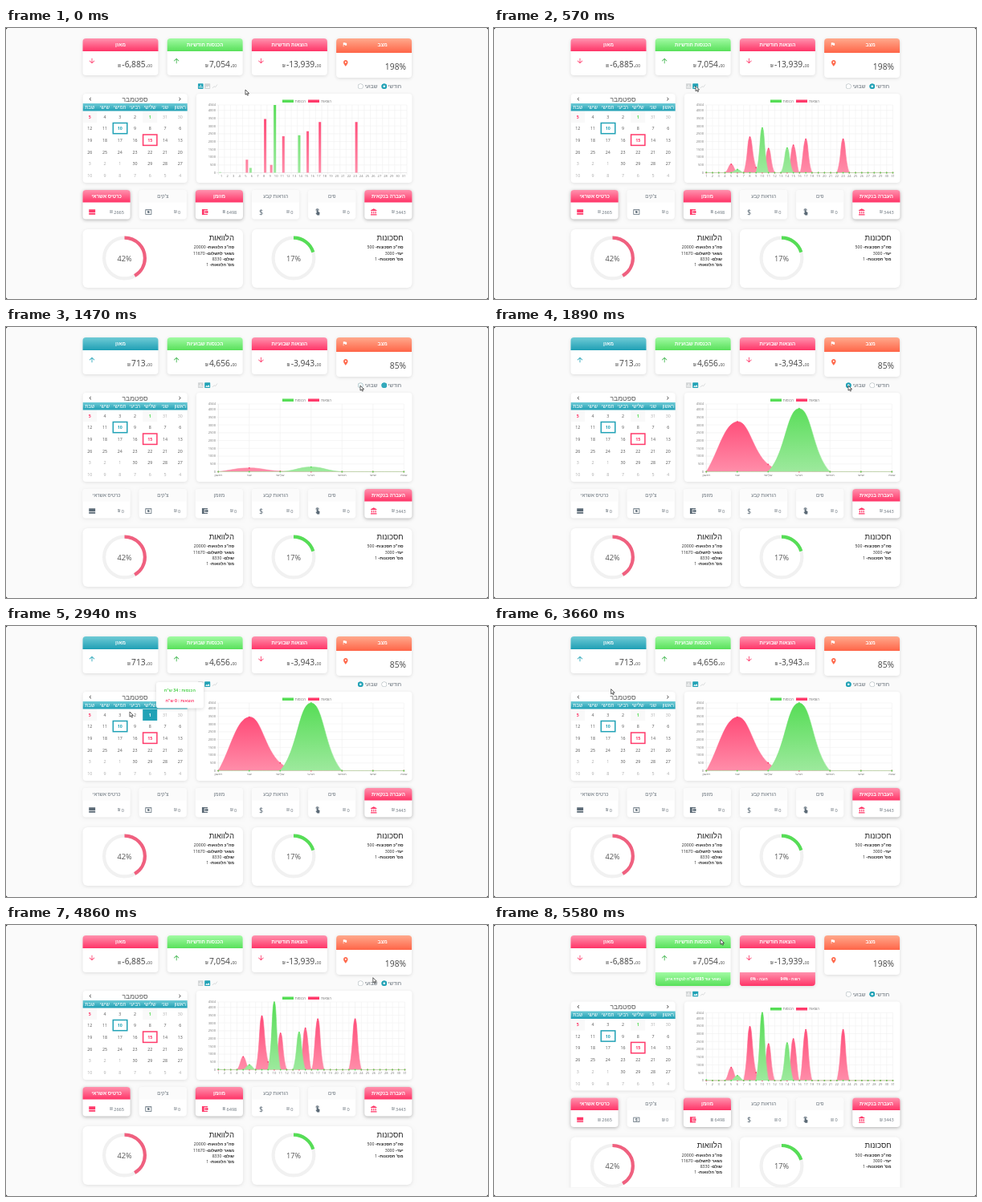
An HTML page with a canvas that plays this animation: 600x338 px, repeating every 6210 ms.

```html
<!DOCTYPE html>
<html lang="he">
<head>
<meta charset="utf-8">
<title>Budget dashboard</title>
<style>
html, body { margin: 0; width: 100%; height: 100%; overflow: hidden; background: #fafafa; }
canvas { display: block; width: 600px; height: 338px; }
</style>
</head>
<body>
<canvas id="stage"></canvas>
<script>
const LOOP = 6210, TO_AREA = 360, TO_WEEK = 1455, TO_MONTH = 4127;
const canvas = document.getElementById('stage'), c = canvas.getContext('2d');
const dpr = window.devicePixelRatio || 1;
canvas.width = 600 * dpr;
canvas.height = 338 * dpr;

const PINK = '#ff3a6b', GREEN = '#56dd56', TEAL = '#21a2b6', GREY = '#667079', DARK = '#444';
const GRADS = {
  pink: ['#ff92ae', '#ff3467'], green: ['#a2fba4', '#58e05a'],
  orange: ['#ffa98c', '#ff6548'], teal: ['#6fcbd6', '#1f9fb4'],
  pinkSeries: [PINK, '#ff8da9'], greenSeries: [GREEN, '#9de99d']
};
const ICONS = {
  down: 'M20 12l-1.4-1.4L13 16.2V4h-2v12.2l-5.6-5.6L4 12l8 8z',
  up: 'M4 12l1.4 1.4L11 7.8V20h2V7.8l5.6 5.6L20 12l-8-8-8 8z',
  pin: 'M12 2C8 2 5 5 5 9c0 5 7 13 7 13s7-8 7-13c0-4-3-7-7-7zM9.5 9a2.5 2.5 0 0 0 5 0a2.5 2.5 0 0 0-5 0z',
  flag: 'M14.4 6L14 4H5v17h2v-7h5.6l.4 2h7V6z',
  card: 'M2 4h20v10H2zM2 16h20v4H2z',
  cash: 'M2 4h20v16H2zM4 6v12h16V6zM9 8h6v2h-4v1h4v5H9v-2h4v-1H9z',
  wallet: 'M21 18v3H3V3h18v3H10v12zM12 8h10v8H12zM14.5 12a1.5 1.5 0 0 0 3 0a1.5 1.5 0 0 0-3 0z',
  touch: 'M9 11V7a2.5 2.5 0 0 1 5 0v4l5 2.5-1 8.5h-7l-5-6 1-1 2 1zM6 7a5.5 5.5 0 0 1 11 0h-2a3.5 3.5 0 0 0-7 0z',
  bank: 'M4 10v7h3v-7zM10 10v7h3v-7zM2 22h19v-3H2zM16 10v7h3v-7zM11.5 1L2 6v2h19V6z',
  left: 'M15.4 7.4L14 6l-6 6 6 6 1.4-1.4L10.8 12z',
  right: 'M8.6 7.4L10 6l6 6-6 6-1.4-1.4L13.2 12z'
};

// Daily sums by day of month
const INCOME = { 1: 34, 6: 312, 10: 4344, 14: 2398 };
const SPENT = { 5: 833, 8: 3443, 9: 500, 11: 2340, 15: 2665, 17: 3249, 23: 3249 };
const month = data => Array.from({ length: 31 }, (_, i) => data[i + 1] || 0);
const WEEK_IN = [0, 0, 0, 4344, 0, 0, 0], WEEK_OUT = [0, 3443, 500, 0, 0, 0, 0];
const DAYS = ['ראשון', 'שני', 'שלישי', 'רביעי', 'חמישי', 'שישי', 'שבת'];

// time, x, y of the pointer tip
const POINTER = [
  [30, 298, 77], [330, 251, 72.5], [680, 251, 72.5], [1260, 435, 75], [1430, 441, 73], [1950, 441, 73],
  [2500, 215, 108], [2700, 180, 110], [2940, 154, 107], [3150, 108, 98], [3270, 96, 80],
  [3540, 96, 80], [4070, 471, 70], [4780, 471, 70], [5080, 392, 46], [5400, 364, 25], [5570, 282, 18]
];

const ramp = (t, a, b) => Math.max(0, Math.min(1, (t - a) / (b - a)));
const smooth = p => p * p * (3 - 2 * p);
const outQuart = p => 1 - (1 - p) ** 4;

function text(s, x, y, size, color, align = 'center', weight = 400) {
  c.font = `${weight} ${size}px "Open Sans", "Noto Sans", sans-serif`;
  c.direction = /[א-ת]/.test(s) ? 'rtl' : 'ltr';
  c.textAlign = align;
  c.textBaseline = 'alphabetic';
  c.fillStyle = color;
  c.fillText(s, x, y + size * .35);
  return c.measureText(s).width;
}

function box(x, y, w, h, r, fill, shadow = 0) {
  c.save();
  if (shadow) {
    c.shadowColor = `rgba(0,0,0,${shadow})`;
    c.shadowBlur = 4 * dpr;
    c.shadowOffsetY = dpr;
  }
  c.fillStyle = fill;
  c.beginPath();
  c.roundRect(x, y, w, h, r);
  c.fill();
  c.restore();
}

function grad(name, y, h) {
  const g = c.createLinearGradient(0, y, 0, y + h);
  GRADS[name].forEach((color, i) => g.addColorStop(i, color));
  return g;
}

function icon(name, x, y, size, color) {
  c.save();
  c.translate(x - size / 2, y - size / 2);
  c.scale(size / 24, size / 24);
  c.fillStyle = color;
  c.fill(new Path2D(ICONS[name]), 'evenodd');
  c.restore();
}

function line(points, color, width) {
  c.strokeStyle = color;
  c.lineWidth = width;
  c.beginPath();
  points.forEach(p => c.lineTo(...p));
  c.stroke();
}

function dot(x, y, r, color) {
  c.fillStyle = color;
  c.beginPath();
  c.arc(x, y, r, 0, 7);
  c.fill();
}

const cardX = i => 95.5 + i * 105.2;

function topCard(i, name, title, sum, arrow, arrowColor, open = 0, foot = []) {
  const x = cardX(i);
  box(x, 13, 94, 46 + 17 * open, 4, '#fff', .12);
  box(x, 13, 94, 16, [4, 4, 0, 0], grad(name, 13, 16));
  text(title, x + 47, 20.8, 6.2, '#fff', 'center', 700);
  icon(arrow, x + 11.5, 41, 10, arrowColor);
  text('00', x + 86.5, 47.3, 5, DARK, 'right');
  const w = text(sum + '.', x + 81, 45.4, 10.3, DARK, 'right');
  text('₪', x + 79.8 - w, 47.3, 5, DARK, 'right');
  if (!open) return;
  c.save();
  c.beginPath();
  c.rect(x, 59, 94, 17 * open);
  c.clip();
  box(x, 59, 94, 17 * open, [0, 0, 4, 4], grad(name, 59, 17));
  foot.forEach(([s, dx]) => text(s, x + dx, 67.8, 4.7, '#fff', 'center', 700));
  c.restore();
}

function topRow(t, week) {
  const span = week ? 'שבועיות' : 'חודשיות';
  topCard(0, week ? 'teal' : 'pink', 'מאזן', week ? '713' : '-6,885', week ? 'up' : 'down', week ? TEAL : PINK);
  topCard(1, 'green', 'הכנסות ' + span, week ? '4,656' : '7,054', 'up', '#3cb54a',
    smooth(ramp(t, 5440, 5575)), [['נשאר עוד 6885 ש"ח לנקודת איזון', 47]]);
  topCard(2, 'pink', 'הוצאות ' + span, week ? '-3,943' : '-13,939', 'down', PINK,
    smooth(ramp(t, 5050, 5350)), [['חובה - 6%', 24], ['רשות - 94%', 63]]);
  const x = cardX(3);
  box(x, 13, 94, 49, 4, '#fff', .12);
  box(x, 13, 94, 18, [4, 4, 0, 0], grad('orange', 13, 18));
  text('מצב', x + 57.6, 20.8, 6.2, '#fff', 'center', 700);
  icon('flag', x + 10.7, 20.5, 7, '#fff');
  icon('pin', x + 11.7, 44, 9.5, '#ff6a4d');
  text(week ? '85%' : '198%', x + 86.9, 48.2, 10.3, DARK, 'right');
}

function radio(x, label, labelRight, on, since) {
  const p = on ? since : 1 - since;
  dot(x, 72.8, 3.3, p > .5 ? TEAL : '#a9b4b8');
  dot(x, 72.8, 2.8, '#fff');
  c.globalAlpha = p;
  dot(x, 72.8, 3.3, TEAL);
  c.globalAlpha = 1;
  if (on) dot(x, 72.8, 1.3, '#fff');
  text(label, labelRight, 72.8, 6.6, GREY, 'right');
}

function toolbar(t, bars, week) {
  const off = '#d2d5d6';
  box(239, 69.3, 6.6, 6.6, .6, bars ? TEAL : off);
  [[240.3, 2.5], [242, 4], [243.7, 1.6]].forEach(([x, h]) => box(x, 74.7 - h, .8, h, 0, '#fff'));
  box(247.2, 69.3, 7, 6.6, .6, bars ? off : TEAL);
  c.fillStyle = '#fff';
  c.fill(new Path2D('M248.2 74.7l1.5-2 1.2 1.2 1.3-2 1.4 2.8z'));
  line([[257, 75], [259, 72.7], [260.6, 73.8], [263, 70.5]], off, .8);
  const start = week ? TO_WEEK : TO_MONTH;
  const since = t < TO_WEEK ? 1 : ramp(t, start, start + 180);
  radio(470.8, 'חודשי', 492, !week, since);
  radio(441.3, 'שבועי', 462.5, week, since);
}

function calendar(t) {
  box(95.7, 82, 130, 111, 4, '#fff', .1);
  text('ספטמבר', 160.5, 89, 8.6, '#555');
  icon('left', 105, 88.5, 8.5, DARK);
  icon('right', 216.3, 88.5, 8.5, DARK);
  box(95.7, 94, 130, 9.5, 0, grad('teal', 94, 9.5));
  box(95.7, 104, 17.5, 14, 0, '#f9f9f9');
  box(170.2, 104, 18, 14, 0, '#f9f9f9');
  const hover = ramp(t, 2620, 2700) * (1 - ramp(t, 2970, 3110));
  c.globalAlpha = hover;
  box(170.2, 104, 18, 14, 0, TEAL);
  c.globalAlpha = 1;
  DAYS.forEach((d, i) => text(d, 216.7 - i * 18.75, 98.6, 6, '#fff', 'center', 500));
  const marks = { 1: hover > .4 ? '#fff' : GREEN, 5: PINK, 10: TEAL, 15: PINK };
  for (let i = 0; i < 42; i++) {
    const n = i - 1, day = n < 1 ? n + 31 : (n - 1) % 30 + 1, inside = n >= 1 && n <= 30;
    const mark = inside && marks[day];
    text(String(day), 216.7 - i % 7 * 18.75, 110.8 + Math.floor(i / 7) * 14.7, 5.3,
      mark || (inside ? '#555' : '#aaa'), 'center', mark ? 700 : 400);
  }
  c.lineWidth = 1.5;
  c.strokeStyle = TEAL;
  c.strokeRect(133.3, 118.5, 17.5, 13.2);
  c.strokeStyle = PINK;
  c.strokeRect(170.6, 133, 17.3, 13.4);
}

const TOP = 96, BASE = 180.5, SCALE = (BASE - TOP) / 4344, LEFT = 264.3;

// Spline with tension .4, its control points kept inside the plot
function area(values, step, grow, name) {
  const pts = values.map((v, i) => [LEFT + i * step, BASE - v * SCALE]);
  const y = v => BASE - (BASE - Math.max(TOP, Math.min(BASE, v))) * grow;
  const handles = pts.map((p, i) => {
    const a = pts[i - 1] || p, b = pts[i + 1] || p;
    const da = Math.hypot(p[0] - a[0], p[1] - a[1]), db = Math.hypot(b[0] - p[0], b[1] - p[1]);
    const at = k => [p[0] + k * (b[0] - a[0]), y(p[1] + k * (b[1] - a[1]))];
    return { before: at(-.4 * da / (da + db)), after: at(.4 * db / (da + db)) };
  });
  const curve = new Path2D();
  curve.moveTo(pts[0][0], y(pts[0][1]));
  for (let i = 1; i < pts.length; i++)
    curve.bezierCurveTo(...handles[i - 1].after, ...handles[i].before, pts[i][0], y(pts[i][1]));
  const body = new Path2D(curve);
  body.lineTo(pts[pts.length - 1][0], BASE);
  body.lineTo(pts[0][0], BASE);
  c.fillStyle = c.strokeStyle = grad(name, TOP, BASE - TOP);
  c.fill(body);
  c.lineWidth = .6;
  c.stroke(curve);
  pts.forEach(p => dot(p[0], y(p[1]), .9, GRADS[name][0]));
}

function chart(t, bars, week) {
  box(237, 82, 268.5, 111, 4, '#fff', .1);
  [[344, GREEN, 'הכנסות'], [376, PINK, 'הוצאות']].forEach(([x, color, label]) => {
    box(x, 89.5, 14, 3.5, 0, color);
    text(label, x + 29, 91.2, 4.2, '#777', 'right');
  });
  const step = bars ? 7.57 : week ? 38.5 : 7.74, count = week ? 7 : bars ? 32 : 31;
  const right = LEFT + step * (count - 1);
  for (let i = 0; i < count; i++) {
    const x = LEFT + i * step;
    line([[x, TOP], [x, BASE + 2.5]], i ? '#ececec' : '#d5d5d5', .5);
    if (bars && i === 31) continue;
    text(week ? DAYS[i] : String(i + 1), x + (bars ? step / 2 : 0), 185, 4.1, '#777');
  }
  for (const v of [0, 500, 1000, 1500, 2000, 2500, 3000, 3500, 4000, 4344]) {
    const y = BASE - v * SCALE;
    line([[LEFT - 2.5, y], [right, y]], v ? '#ececec' : '#d5d5d5', .5);
    text(String(v), LEFT - 3.3, y, 4.1, '#777', 'right');
  }
  if (bars) {
    const columns = (data, dx, name) => Object.entries(data).forEach(([day, v]) =>
      box(LEFT + (day - .5) * step + dx, BASE - v * SCALE, 3, v * SCALE, 0, grad(name, TOP, BASE - TOP)));
    columns(SPENT, 0, 'pinkSeries');
    columns(INCOME, -3, 'greenSeries');
    return;
  }
  const start = week ? TO_WEEK : t < TO_WEEK ? TO_AREA : TO_MONTH;
  const grow = outQuart(ramp(t, start, start + 890));
  area(week ? WEEK_OUT : month(SPENT), step, grow, 'pinkSeries');
  area(week ? WEEK_IN : month(INCOME), step, grow, 'greenSeries');
}

function payments(week) {
  [['כרטיס אשראי', 2665, 'card'], ["צ'קים", 0, 'cash'], ['מזומן', 6498, 'wallet'],
    ['הוראות קבע', 0, '$'], ['פים', 0, 'touch'], ['העברה בנקאית', 3443, 'bank']
  ].forEach(([label, sum, name], i) => {
    const x = 95.5 + i * 70.15, value = week && i < 5 ? 0 : sum, on = value > 0;
    box(x, 202, 59.2, 36.5, 4, '#fff', on ? .3 : .08);
    box(x, 202, 59.2, 15.5, [4, 4, 0, 0], on ? grad('pink', 202, 15.5) : '#fbfbfb');
    text(label, x + 29.7, 209.8, 6.2, on ? '#fff' : GREY, 'center', on ? 700 : 400);
    const color = on ? PINK : '#5b6a76';
    if (name === '$') text('$', x + 11.7, 229.5, 9, color);
    else icon(name, x + 11.7, 229.5, 9.5, color);
    const w = text(String(value), x + 51.5, 229.8, 5.6, GREY, 'right');
    text('₪', x + 50.2 - w, 229.8, 4.7, GREY, 'right');
  });
}

function donut(x, color, degrees, percent, title, rows) {
  box(x, 251, 199.5, 73, 6, '#fff', .1);
  const ring = (from, to, style) => {
    c.strokeStyle = style;
    c.lineWidth = 4.2;
    c.beginPath();
    c.arc(x + 52, 287, 25.4, from, to);
    c.stroke();
  };
  ring(0, 7, '#f1f1f1');
  ring(-Math.PI / 2, (degrees - 90) * Math.PI / 180, color);
  text(percent, x + 52, 287.3, 9.2, '#555');
  text(title, x + 188.5, 261.7, 9.6, '#222', 'right', 500);
  rows.forEach(([label, value], i) => {
    const y = 273.6 + i * 7.1;
    const w = text(label + '-', x + 188.5, y, 5.2, '#222', 'right', 700);
    text(value, x + 187 - w, y, 5.2, '#222', 'right');
  });
}

function tooltip(t) {
  c.globalAlpha = ramp(t, 2640, 2760) * (1 - ramp(t, 3020, 3140));
  if (c.globalAlpha) {
    box(187, 70, 59, 32.5, 3, '#fff', .15);
    text('הכנסות : 34 ש"ח', 216.3, 80.3, 5.2, '#4bd04b', 'center', 700);
    text('הוצאות : 0 ש"ח', 216.3, 93, 5.2, PINK, 'center', 700);
  }
  c.globalAlpha = 1;
}

function pointer(t) {
  let i = POINTER.findIndex(k => k[0] > t);
  if (i < 0) i = POINTER.length - 1;
  const b = POINTER[i], a = POINTER[i - 1] || b;
  const p = a === b ? 0 : smooth(ramp(t, a[0], b[0]));
  c.save();
  c.translate(a[1] + (b[1] - a[1]) * p, a[2] + (b[2] - a[2]) * p);
  const arrow = new Path2D('M0 0V6.2L1.5 4.9 2.5 7.1 3.5 6.7 2.6 4.5H4.5z');
  c.fillStyle = '#fff';
  c.fill(arrow);
  c.strokeStyle = '#222';
  c.lineWidth = .7;
  c.stroke(arrow);
  c.restore();
}

function draw(t) {
  const bars = t < TO_AREA, week = t >= TO_WEEK && t < TO_MONTH;
  c.setTransform(dpr, 0, 0, dpr, 0, 0);
  c.fillStyle = '#000';
  c.fillRect(0, 0, 600, 338);
  box(0, 0, 600, 338, 2.5, '#fafafa');

  c.save();
  c.beginPath();
  c.rect(0, 0, 600, 327.5);
  c.clip();
  c.translate(0, 13.4 * smooth(ramp(t, 5050, 5350)));
  toolbar(t, bars, week);
  calendar(t);
  chart(t, bars, week);
  payments(week);
  donut(95.5, '#f0607f', 150, '42%', 'הלוואות', [['סה"כ הלוואות', '20000'],
    ['נשאר לתשלום', '11670'], ['שולם', '8330'], ["מס' הלוואות", '1']]);
  donut(306, GREEN, 73, '17%', 'חסכונות', [['סה"כ חסכונות', '500'],
    ['יעד', '3000'], ["מס' חסכונות", '1']]);
  c.restore();

  topRow(t, week);
  tooltip(t);
  pointer(t);
}

const begin = performance.now();
function tick() {
  draw((performance.now() - begin) % LOOP);
  requestAnimationFrame(tick);
}
tick();
</script>
</body>
</html>
```
